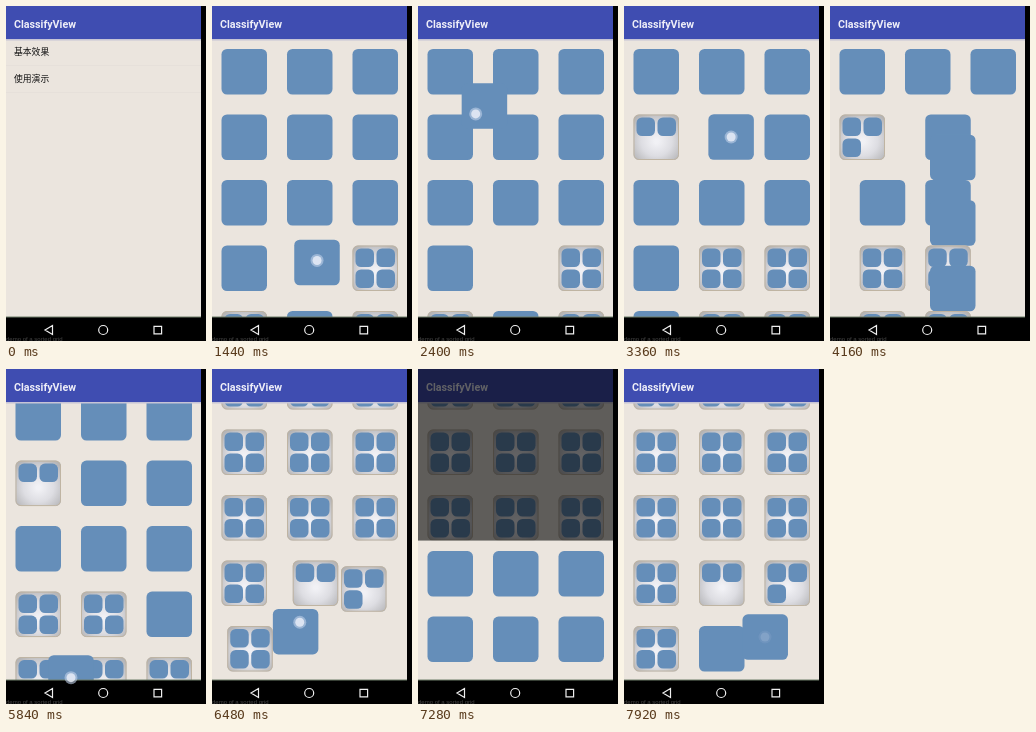
These frames come from a looping animation (200 by 335 pixels, 8000 ms). An HTML page with a canvas:

```html
<!DOCTYPE html>
<html lang="zh">
<head>
<meta charset="utf-8">
<title>ClassifyView</title>
<style>
html, body { margin: 0; width: 100%; height: 100%; overflow: hidden; background: #000; }
canvas { display: block; width: 200px; height: 335px; }
</style>
</head>
<body>
<canvas id="stage"></canvas>
<script>
const canvas = document.getElementById('stage'), c = canvas.getContext('2d');
const ratio = window.devicePixelRatio || 1;
canvas.width = 200 * ratio;
canvas.height = 335 * ratio;

const LOOP = 8000, WIDTH = 195, BOTTOM = 311, PANEL = 170, LAG = 40;
const SIZE = 45.5, MINI = 18.5, PITCH = 65.5, SCROLL = 375.5;
const BLUE = '#658eb9', PAPER = '#ebe5de', HEADER = '#3f4db1';

const ramp = (t, a, b) => Math.min(1, Math.max(0, (t - a) / (b - a)));
const out = u => 1 - (1 - u) ** 2;
const smooth = u => u * u * (3 - 2 * u);
const mix = (a, b, k) => a + (b - a) * k;
const mix2 = (p, q, k) => [mix(p[0], q[0], k), mix(p[1], q[1], k)];
const slot = (i, top = 43) => [9.5 + i % 3 * PITCH, top + Math.floor(i / 3) * PITCH];
const mid = (i, top) => slot(i, top).map(v => v + SIZE / 2);
const miniSpot = (x, y, i) => [x + 3 + i % 2 * 21, y + 3 + (i >> 1) * 21];
const scroll = t => SCROLL * ramp(t, 5815, 6393);

// Each move takes an entry out of the grid and may put it back at an index
const moves = [[2720, 10], [4050, 4], [5250, 30, 28], [6120, 30, 25], [6305, 30, 28], [7700, 31, 29]];
const orders = [[0, Array.from({ length: 30 }, (_, i) => i)]];
for (const [time, id, index] of moves) {
  const list = orders.at(-1)[1].filter(i => i !== id);
  if (index) list.splice(index, 0, id);
  orders.push([time, list]);
}

// Finger paths; a drag ends in a folder's mini or in a grid slot
const drags = [
  { id: 10, mini: 1, keys: [[1260, mid(10)], [1400, [105, 256.5]], [2080, [110, 60]], [2600, mid(3)]] },
  { id: 4, mini: 2, keys: [[3180, mid(4)], [3340, [107.5, 131]], [3860, mid(3)]] },
  { id: 30, keys: [[4820, mid(1, PANEL + 10.5)], [5120, [85, 140]], [5750, [65, 309]],
    [6250, [65, 305]], [6540, [90.5, 247]], [6760, mid(28, 43 - SCROLL)]] },
  { id: 31, keys: [[7330, mid(2, PANEL + 10.5)], [7560, [150, 140]], [7880, [141, 268]], [7920, [141, 268]]] }
];
const panels = [
  { open: 4490, close: 5080, count: 3, taken: 1, at: 4820, tap: mid(3) },
  { open: 7120, close: 7560, count: 6, taken: 2, at: 7330, tap: mid(27, 43 - SCROLL) }
];
const start = d => d.keys[0][0], end = d => d.keys.at(-1)[0];

function along(keys, t) {
  let i = 1;
  while (i < keys.length - 1 && t > keys[i][0]) i++;
  const [[a, p], [b, q]] = [keys[i - 1], keys[i]];
  return mix2(p, q, smooth(ramp(t, a, b)));
}

function place(id, t) {
  let p = null;
  for (const [time, list] of orders) {
    if (t < time) break;
    const i = list.indexOf(id);
    if (i < 0) continue;
    p = p ? mix2(p, slot(i), out(ramp(t, time, time + 250))) : slot(i);
  }
  return p && [p[0], p[1] - scroll(t)];
}

function minis(id, t) {
  if (id === 3) return t < 2800 ? 1 : t < 4060 || t > 4820 ? 2 : 3;
  if (id === 16 || id === 27) return 2;
  return id === 28 ? 3 : 4;
}

function block(x, y, s = SIZE, fill = BLUE) {
  c.fillStyle = fill;
  c.beginPath();
  c.roundRect(x, y, s, s, 5.5);
  c.fill();
}

function folder(x, y, count) {
  const g = c.createRadialGradient(x + 23, y + 27, 2, x + 23, y + 25, 32);
  g.addColorStop(0, '#f1f1f5');
  g.addColorStop(.45, '#dddde2');
  g.addColorStop(1, '#aeaeb0');
  block(x, y, SIZE, g);
  c.strokeStyle = '#bfb4a2';
  c.lineWidth = 1;
  c.beginPath();
  c.roundRect(x + .5, y + .5, SIZE - 1, SIZE - 1, 5);
  c.stroke();
  for (let i = 0; i < count; i++) block(...miniSpot(x, y, i), MINI);
}

function entry(id, x, y, t) {
  const k = id === 3 ? out(ramp(t, 2480, 2640)) : 1;
  const isFolder = id === 3 || id === 11 || id === 12 || id > 13 && id < 30;
  if (!isFolder || !k) return block(x, y);
  if (k === 1) return folder(x, y, minis(id, t));
  c.save();
  c.globalAlpha *= k;
  folder(x, y, 0);
  c.restore();
  block(x + 3 * k, y + 3 * k, mix(SIZE, MINI, k));
}

function header() {
  c.fillStyle = HEADER;
  c.fillRect(0, 0, WIDTH, 33);
  c.fillStyle = '#c6c4d6';
  c.fillRect(0, 33, WIDTH, 1.5);
  c.fillStyle = '#eeeef8';
  c.font = '700 10.7px Roboto, sans-serif';
  c.fillText('ClassifyView', 8, 22);
}

function paper() {
  c.fillStyle = PAPER;
  c.fillRect(0, 0, WIDTH, BOTTOM);
}

function menu(t) {
  paper();
  c.fillStyle = `rgba(0,0,0,${.12 * ramp(t, 140, 320)})`;
  c.fillRect(0, 33, WIDTH, 26);
  c.font = '8.8px "Noto Sans CJK SC", "Noto Sans CJK", sans-serif';
  ['基本效果', '使用演示'].forEach((text, i) => {
    c.fillStyle = '#e4dfd9';
    c.fillRect(0, 59 + 27 * i, WIDTH, .7);
    c.fillStyle = '#111';
    c.fillText(text, 8, 49.3 + 26.3 * i);
  });
  header();
}

function grid(t) {
  paper();
  for (let id = 0; id < 32; id++) {
    const drag = drags.find(d => d.id === id);
    if (drag && t >= start(drag) && (drag.mini || t < end(drag) + 200)) continue;
    const p = place(id, t);
    if (p && p[1] > -SIZE && p[1] < BOTTOM) entry(id, ...p, t);
  }
  header();
}

function panel({ open, close, count, taken, at }, t) {
  const k = out(ramp(t, open, open + 180)) * (1 - ramp(t, close, close + 170));
  if (!k) return;
  c.fillStyle = `rgba(0,0,0,${.6 * k})`;
  c.fillRect(0, 0, WIDTH, BOTTOM);
  const top = mix(BOTTOM, PANEL, k);
  c.fillStyle = PAPER;
  c.fillRect(0, top, WIDTH, BOTTOM - PANEL);
  for (let i = 0; i < count; i++) {
    if (i === taken && t >= at) continue;
    const to = i > taken ? i - 1 : i;
    block(...mix2(slot(i, top + 10.5), slot(to, top + 10.5), out(ramp(t, at + 150, at + 400))));
  }
}

function dragged(d, t) {
  const last = end(d);
  if (t < start(d) || t >= last + 200) return;
  const from = along(d.keys, Math.min(t - LAG, last)).map(v => v - SIZE / 2);
  const k = out(ramp(t, last, last + 200));
  const to = d.mini ? miniSpot(...place(3, t), d.mini) : k ? place(d.id, t) : from;
  block(...mix2(from, to, k), mix(SIZE, d.mini ? MINI : SIZE, k));
}

function nav() {
  c.fillStyle = '#000';
  c.fillRect(0, BOTTOM, 200, 24);
  c.fillRect(WIDTH, 0, 5, 335);
  c.fillStyle = '#6f7f6a';
  c.fillRect(0, BOTTOM - .5, WIDTH, 1);
  c.strokeStyle = '#eee';
  c.lineWidth = 1.2;
  c.beginPath();
  c.moveTo(46.5, 319.5);
  c.lineTo(39, 324);
  c.lineTo(46.5, 328.5);
  c.closePath();
  c.moveTo(101.7, 324);
  c.arc(97.2, 324, 4.5, 0, 7);
  c.rect(148, 320.3, 7.6, 7.6);
  c.stroke();
  c.fillStyle = '#444';
  c.font = '6px "Liberation Sans", sans-serif';
  c.fillText('demo of a sorted grid', 0, 335);
}

function touch([x, y], alpha) {
  if (alpha <= 0) return;
  c.globalAlpha = alpha;
  for (const [r, shade] of [[6.5, 'rgba(190,206,232,.6)'], [4.5, 'rgba(236,240,249,.8)']]) {
    c.fillStyle = shade;
    c.beginPath();
    c.arc(x, y, r, 0, 7);
    c.fill();
  }
  c.globalAlpha = 1;
}

const press = (t, a, b) => t < a ? 0 : 1 - ramp(t, b - 80, b + 20);

function draw(t) {
  c.setTransform(ratio, 0, 0, ratio, 0, 0);
  c.clearRect(0, 0, 200, 335);
  const shown = out(ramp(t, 440, 760));
  if (shown < 1) menu(t);
  if (shown) {
    c.save();
    c.globalAlpha = shown;
    c.translate(0, 40 * (1 - shown));
    grid(t);
    c.restore();
  }
  panels.forEach(p => panel(p, t));
  drags.forEach(d => dragged(d, t));
  nav();
  touch([97, 46], press(t, 140, 420));
  panels.forEach(p => touch(p.tap, press(t, p.open - 100, p.open)));
  drags.forEach(d => touch(along(d.keys, t), press(t, start(d), end(d))));
}

const begin = performance.now();
function tick() {
  draw((performance.now() - begin) % LOOP);
  requestAnimationFrame(tick);
}
tick();
</script>
</body>
</html>
```
